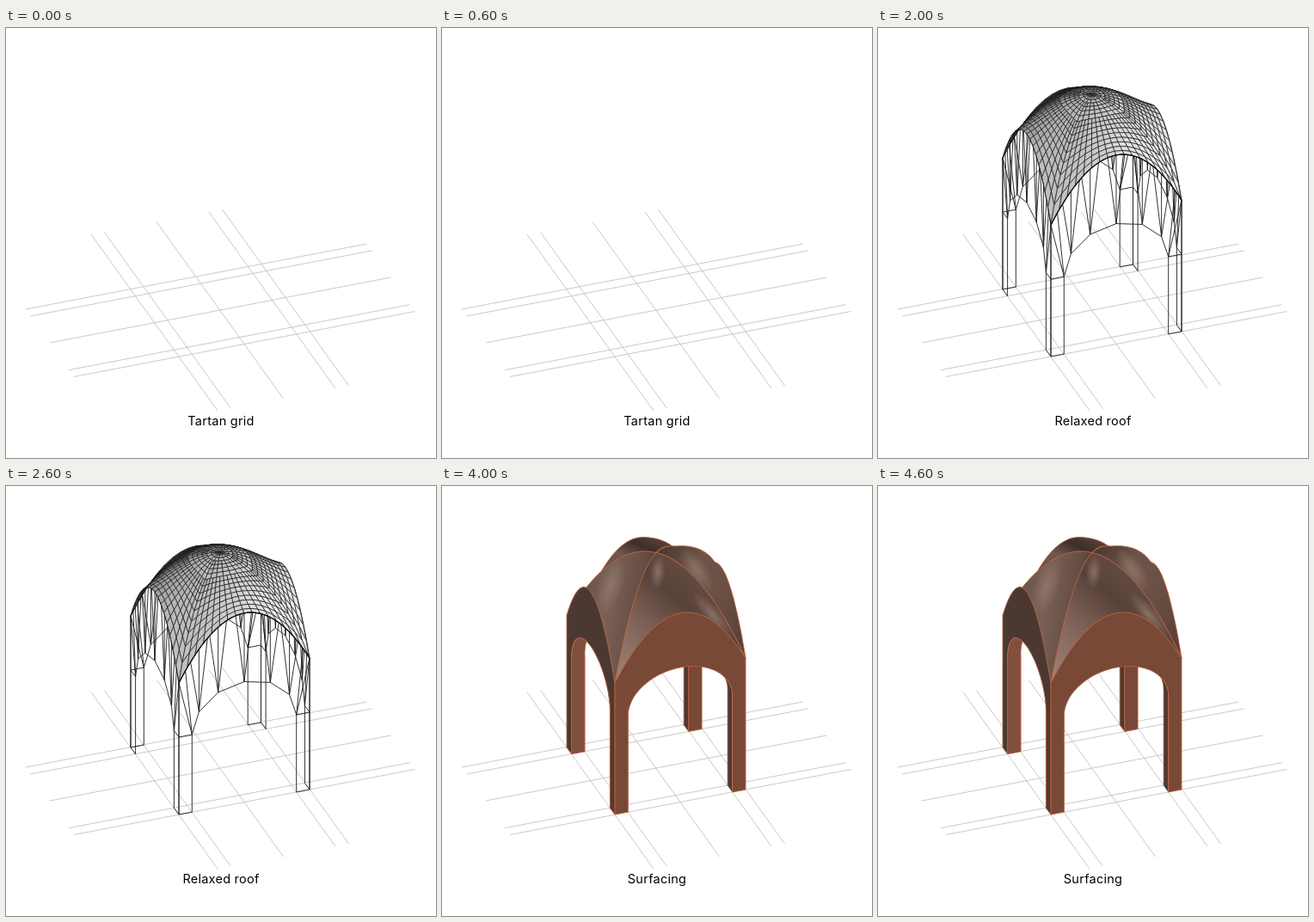
Recreate the animation shown at these times as an HTML page. Size 500 by 500 pixels, loop 5000 ms.

```html
<!DOCTYPE html>
<html lang="en">
<head>
<meta charset="utf-8">
<title>Vault study</title>
<style>
  html, body { margin: 0; width: 100%; height: 100%; overflow: hidden; background: #fff; }
  svg { display: block; width: 100vw; height: 100vh; }
  path { stroke-linejoin: round; }
  text { font: 400 14.5px Inter, "Open Sans", sans-serif; letter-spacing: .25px; text-anchor: middle; fill: #000; }
  .step { visibility: hidden; animation: show 5s step-end infinite; animation-delay: calc((var(--i) - 5) * 1s); }
  @keyframes show { 0% { visibility: visible; } 20%, 100% { visibility: hidden; } }
</style>
</head>
<body>
<svg id="stage" viewBox="0 0 500 500">
  <defs>
    <linearGradient id="back" x1="0" y1="1" x2=".9" y2="0">
      <stop offset="0" stop-color="#6a5046"/><stop offset=".45" stop-color="#71574c"/>
      <stop offset=".7" stop-color="#3d2f2a"/><stop offset="1" stop-color="#5d463c"/>
    </linearGradient>
    <linearGradient id="right" x1="0" y1="0" x2="1" y2=".8">
      <stop offset="0" stop-color="#46362f"/><stop offset=".35" stop-color="#6d5348"/>
      <stop offset=".65" stop-color="#6a4f44"/><stop offset="1" stop-color="#5a4137"/>
    </linearGradient>
    <linearGradient id="left" x1="0" y1=".3" x2="1" y2=".5">
      <stop offset="0" stop-color="#5d483f"/><stop offset=".45" stop-color="#7a6157"/>
      <stop offset=".8" stop-color="#654d43"/><stop offset="1" stop-color="#46362f"/>
    </linearGradient>
    <linearGradient id="front" x1="0" y1=".9" x2=".8" y2="0">
      <stop offset="0" stop-color="#9a8074"/><stop offset=".35" stop-color="#7c6055"/>
      <stop offset=".6" stop-color="#57423a"/><stop offset="1" stop-color="#725448"/>
    </linearGradient>
    <radialGradient id="sheen">
      <stop offset="0" stop-color="#92786c" stop-opacity=".85"/>
      <stop offset="1" stop-color="#92786c" stop-opacity="0"/>
    </radialGradient>
  </defs>
</svg>
<script>
const L = [145, 151], B = [296.5, 122], F = [201, 229], R = [353, 200];
const E1 = [15.3, -2.9], E2 = [5.6, 7.6];   // pier widths along both axes
const HEIGHT = 153, RISE = 66.7, CROWN = 98;
const walls = [[L, B, E1], [B, R, E2], [L, F, E2], [F, R, E1]];

const add = (p, q, k = 1) => [p[0] + q[0] * k, p[1] + q[1] * k];
const lift = (p, h) => [p[0], p[1] - h];
const mix = (p, q, t) => [p[0] + (q[0] - p[0]) * t, p[1] + (q[1] - p[1]) * t];
const range = n => Array.from({ length: n }, (_, i) => i);
const foot = p => lift(p, -HEIGHT);

// Point on an arch above the chord p-q; a higher power gives a flatter top.
const archAt = (p, q, h, power, t) => lift(mix(p, q, t), h * (1 - Math.abs(2 * t - 1) ** power));
const arch = (p, q, h, power = 2, n = 40, t0 = 0, t1 = 1) =>
  range(n + 1).map(i => archAt(p, q, h, power, t0 + (t1 - t0) * i / n));
const ellipse = (p, q, h, n = 40) => range(n + 1).map(i => {
  const a = Math.PI * i / n;
  return lift(mix(p, q, (1 - Math.cos(a)) / 2), h * Math.sin(a));
});
const opening = ([p, q, e], spring, h, n) =>
  ellipse(lift(foot(add(p, e)), spring), lift(foot(add(q, e, -1)), spring), h, n);

const line = pts => 'M' + pts.map(p => p.map(v => v.toFixed(1))).join('L');
const area = pts => line(pts) + 'Z';
const path = (d, stroke, width = 1, fill = 'none') =>
  `<path d="${d}" stroke="${stroke}" stroke-width="${width}" fill="${fill}"/>`;

function grid() {
  const rows = [[23, 327], [28.5, 335], [51, 366], [73, 397.7], [79, 405.5]];
  const cols = [[99, 240], [114.5, 237.5], [175.5, 226], [236, 214], [251.5, 211]];
  return path(rows.map(p => line([p, add(p, [396.5, -76])])).join('') +
    cols.map(p => line([p, add(p, [147, 205])])).join(''), '#bbb', .8);
}

// Wall of narrow triangles hanging from its arch down to the piers.
function meshWall(wall, h, power) {
  const [p, q] = wall, low = opening(wall, 90, 50, 6);
  const top = t => archAt(p, q, h, power, t);
  let d = line(arch(p, q, h, power, 24)) + line(low);
  for (const v of low.slice(1, -1)) {
    const t = (v[0] - p[0]) / (q[0] - p[0]);
    d += [-.065, 0, .065].map(s => line([v, top(t + s)])).join('');
  }
  [[p, low[0], .05], [q, low[6], .95]].forEach(([corner, s, t]) => {
    const base = foot(corner);
    d += line([top(t), s, corner, base, lift(s, -90), s, lift(base, 90)]);
  });
  return d;
}

function tessellation() {
  const at = (a, b) => [L[0] + 151.5 * a + 56 * b, L[1] - 29 * a + 78 * b];
  const ring = range(8).map(i => at(.5 + .25 * Math.cos(i * Math.PI / 4), .5 + .25 * Math.sin(i * Math.PI / 4)));
  const red = area([L, B, R, F]) + line([L, R]) + line([F, B]) + area(ring) +
    line([mix(L, B, .5), mix(F, R, .5)]) + line([mix(L, F, .5), mix(B, R, .5)]);
  return path(walls.map(w => meshWall(w, 46.8, 2.3)).join(''), '#444', .7) + path(red, '#ff6a6a', .8);
}

function roofMesh() {
  const bend = 2 * RISE - CROWN, dip = 16;
  const place = (u, v) => {
    const a = 1 - u * u, b = 1 - v * v;
    const z = RISE * (a + b) - a * b * (bend + dip * (u * u + v * v));
    return lift([248.75 + 75.75 * u + 28 * v, 175.5 - 14.5 * u + 39 * v], z);
  };
  // Rings run from a circle at the centre to the square edge.
  const node = (ring, spoke) => {
    const side = Math.floor(spoke / 16) % 4, e = (spoke % 16) / 8 - 1;
    const [x, y] = [[e, -1], [1, e], [-e, 1], [-1, -e]][side];
    const s = ring / 16, len = Math.hypot(x, y), k = s * (1 + (len - 1) * s) / len;
    return [x * k, y * k];
  };
  const cells = [];
  for (let r = 0; r < 16; r++) {
    const step = r < 3 ? 4 : r < 7 ? 2 : 1;
    for (let k = 0; k < 64; k += step) {
      const quad = [node(r, k), node(r + 1, k), node(r + 1, k + step), node(r, k + step)];
      const u = quad.reduce((s, c) => s + c[0], 0) / 4, v = quad.reduce((s, c) => s + c[1], 0) / 4;
      const nx = 2 * u * (RISE - bend * (1 - v * v)), ny = 2 * v * (RISE - bend * (1 - u * u));
      const n = Math.hypot(nx, ny, 75);
      const tone = Math.round(180 + 38 * nx / n + 58 * ny / n);
      cells.push({ depth: 39 * v - 14.5 * u, d: area(quad.map(c => place(...c))), fill: `rgb(${tone},${tone},${tone})` });
    }
  }
  return cells.sort((a, b) => a.depth - b.depth).map(c => path(c.d, '#181818', .7, c.fill)).join('');
}

function relaxed() {
  const wall = i => path(meshWall(walls[i], RISE, 2), '#1c1c1c', .9);
  return wall(0) + wall(1) + roofMesh() + wall(2) + wall(3) + path(line(arch(F, R, RISE)), '#111', 1.3);
}

function approximation() {
  let black = '', red = line(arch(L, R, CROWN)) + line(arch(F, B, CROWN));
  for (const w of walls) {
    const [p, q, e] = w, a = foot(p), b = foot(q);
    black += line([p, a, add(a, e), ...opening(w, 112, 44.5), add(b, e, -1), b, q]);
    red += line(arch(p, q, RISE));
  }
  const base = foot(L), inner = add(base, E2);
  return path(black, '#111', 1) +
    path(line([L, base]) + line([inner, lift(inner, 112)]), '#111', 1.7) + path(red, '#ff1a1a', 1);
}

function surfacing() {
  const edge = '#b9603f', brown = '#784936', dark = '#4b3931';
  const half = (p, q, t0, t1) => arch(p, q, CROWN, 2, 24, t0, t1);
  const rev = pts => [...pts].reverse();
  const shell = (pts, id) => path(area(pts), `url(#${id})`, .6, `url(#${id})`);
  const blob = (x, y, rx, ry, turn) =>
    `<ellipse cx="${x}" cy="${y}" rx="${rx}" ry="${ry}" transform="rotate(${turn} ${x} ${y})" fill="url(#sheen)"/>`;

  const rim = w => {
    const [p, q, e] = w;
    return [add(foot(p), e), ...opening(w, 112, 44.5), add(foot(q), e, -1)];
  };
  const face = (w, fill) => {
    const [p, q] = w;
    return path(area([p, foot(p), ...rim(w), foot(q), q, ...rev(arch(p, q, RISE))]), edge, .9, fill);
  };
  // Thickness of a wall seen through its own opening.
  const reveal = (w, shift, fill, id) => {
    const near = rim(w), far = near.map(v => add(v, shift));
    const through = area([near[0], ...far, near[near.length - 1]]);
    return `<clipPath id="${id}"><path d="${area(near)}"/></clipPath><g clip-path="url(#${id})">` +
      `<path fill-rule="evenodd" d="${area(near) + through}" fill="${fill}"/>` +
      path(line(far), edge, .8) + '</g>';
  };
  const pier = (a, b, h, fill) => path(area([a, b, lift(b, h), lift(a, h)]), edge, .8, fill);

  const bBase = foot(B), bLeft = add(bBase, E1, -1), bInner = add(bLeft, E2);
  const lInner = add(foot(L), E2);
  const gable = arch(B, R, RISE, 2, 24, .37, 1);
  const rightLobe = 'M249 78C256 71 263 69 271 70C292 68 307 74 317 88' +
    line([...gable, ...half(L, R, 1, .5)]).replace('M', 'L') + 'Z';

  return pier(bLeft, bInner, 100, dark) + pier(bInner, add(bBase, E2), 100, brown) +
    pier(lInner, add(lInner, E1), 112, brown) +
    path('M186 98C198 78 214 59 235 59.5C252 60 264 66 270 72L249 85L190 106Z', edge, .9, 'url(#back)') +
    path(rightLobe, edge, .9, 'url(#right)') + blob(296, 98, 13, 30, -35) +
    shell([...half(L, R, 0, .5), ...half(F, B, .5, 0), ...rev(arch(L, F, RISE))], 'left') +
    blob(196, 117, 14, 36, 20) +
    shell([...half(F, B, 0, .5), ...half(L, R, .5, 1), ...rev(arch(F, R, RISE))], 'front') +
    blob(251, 100, 9, 20, 5) + blob(315, 150, 10, 34, -42) +
    path(line(arch(L, R, CROWN)) + line(half(F, B, 0, .65)), edge, 1) +
    reveal(walls[2], E1, '#80503c', 'leftHole') + reveal(walls[3], [-5.6, -7.6], dark, 'frontHole') +
    face(walls[2], dark) + face(walls[3], brown);
}

const steps = [
  ['Tartan grid', () => ''],
  ['Tesselation', tessellation],
  ['Relaxed roof', relaxed],
  ['Approximation', approximation],
  ['Surfacing', surfacing],
];
document.getElementById('stage').insertAdjacentHTML('beforeend', grid() + steps.map(([name, draw], i) =>
  `<g class="step" style="--i:${i}">${draw()}<text x="250" y="462">${name}</text></g>`).join(''));
</script>
</body>
</html>
```
